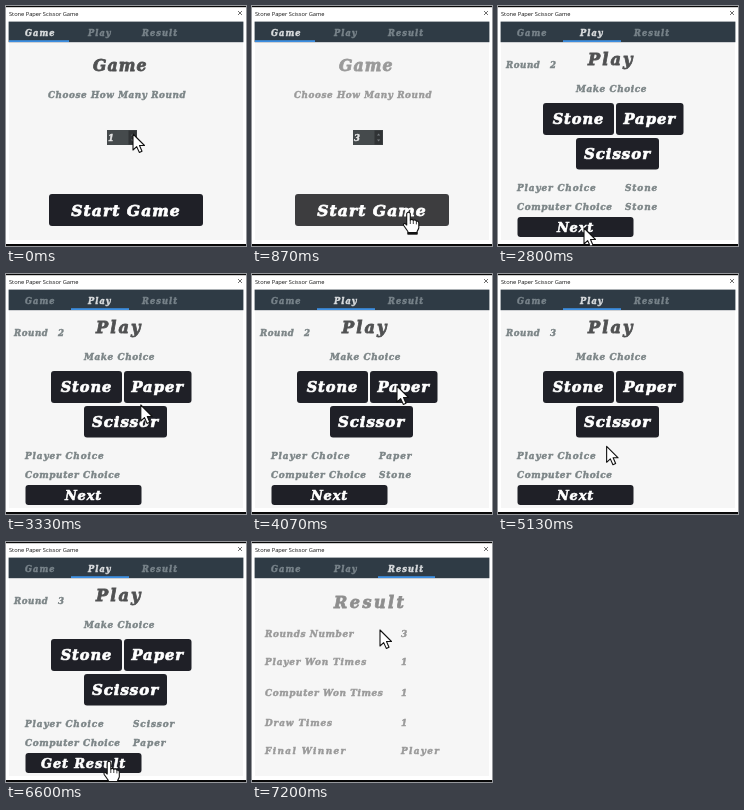
These frames come from a looping animation (240x240 px, 7.27 s). An HTML page:

```html
<!DOCTYPE html>
<html lang="en">
<head>
<meta charset="utf-8">
<title>Stone Paper Scissor Game</title>
<style>
html, body { margin: 0; width: 100%; height: 100%; overflow: hidden; background: #fff; }
svg { display: block; width: 100vw; height: 100vh; }
text { white-space: pre; }
.fun { font-family: "DejaVu Serif", serif; font-weight: 700; font-style: italic; fill: currentColor; stroke: currentColor; stroke-width: .05em; }
.title { font: 5.7px "Open Sans", sans-serif; fill: #111; }
</style>
</head>
<body>
<svg id="stage" viewBox="0 0 240 240"></svg>
<script>
const LOOP = 7270;
const NS = "http://www.w3.org/2000/svg";
const DARK = "#505152", SOFT = "#7c8587", PALE = "#9a9a9a";
const INK = "#1f2027", HOVER = "#3d3d3f";
const TAB = "#78838a", TAB_ON = "#d9dcde";
const stage = document.getElementById("stage");

function add(parent, tag, attrs) {
  const el = document.createElementNS(NS, tag);
  for (const k in attrs) el.setAttribute(k, attrs[k]);
  parent.appendChild(el);
  return el;
}
const rect = (p, x, y, width, height, fill, rx = 0) =>
  add(p, "rect", { x, y, width, height, fill, rx });

function setText(el, str) {
  if (el.textContent !== str) el.textContent = str;
}
// Low, wide, heavy lettering: slightly smaller type with open tracking
function label(p, x, y, size, str, color, gap = 0, anchor = "start") {
  const el = add(p, "text", {
    x, y: y - size * .04, class: "fun", color, "font-size": size * .9,
    "letter-spacing": size * .06 + gap, "text-anchor": anchor
  });
  setText(el, str);
  return el;
}
function button(p, x, y, w, h, size, str) {
  const box = rect(p, x, y, w, h, INK, 3);
  const text = label(p, x + w / 2, y + h / 2 + size * .36, size, str, "#fff", 0, "middle");
  return { box, text };
}
const show = (el, on) => el.setAttribute("display", on ? "inline" : "none");

// Window
rect(stage, 0, 0, 240, 240, "#fff");
rect(stage, 3, 36, 234, 198, "#f6f6f6");
add(stage, "text", { x: 3, y: 10, class: "title" }).textContent = "Stone Paper Scissor Game";
add(stage, "path", { d: "M232 5l4 4m0-4l-4 4", stroke: "#333", "stroke-width": .7 });
rect(stage, 2.6, 15.6, 234.8, 20.6, "#2f3b45");
const tabs = [[19, "Game"], [82, "Play"], [136, "Result"]]
  .map(([x, s]) => label(stage, x, 30, 9.2, s, TAB, .5));
const underline = rect(stage, 3, 34.2, 60, 1.8, "#3d8ee0");
const lines = [[3, 60], [65, 58], [126, 57]];

// Game page
const game = add(stage, "g", {});
const gameHead = label(game, 87, 66, 17.5, "Game", DARK);
const gameSub = label(game, 42, 92.5, 9.8, "Choose How Many Round", SOFT);
rect(game, 101, 124, 30, 15, "#454a4c");
rect(game, 122.5, 124.5, 8, 14, "#303335");
add(game, "path", { d: "M125 129.5l1.6-2 1.6 2zM125 133.5l1.6 2 1.6-2z", fill: "#777c80" });
const rounds = label(game, 102, 135, 9.5, "1", "#e4e4e4");
const start = button(game, 43, 188, 154, 32, 17.3, "Start Game");

// Play page
const play = add(stage, "g", {});
label(play, 90, 60, 18, "Play", DARK, 1);
label(play, 8, 62.5, 9.6, "Round", SOFT);
const roundNo = label(play, 52, 62.5, 9.6, "1", SOFT);
label(play, 78, 86.5, 9.9, "Make Choice", SOFT);
button(play, 45, 97, 71, 32, 16.2, "Stone");
button(play, 118, 97, 67.5, 32, 16.4, "Paper");
button(play, 78, 132, 83, 31.5, 16.6, "Scissor");
label(play, 19, 185, 9.9, "Player Choice", SOFT, .25);
label(play, 19, 204, 9.9, "Computer Choice", SOFT);
const mine = label(play, 127, 185, 9.9, "", SOFT, .3);
const theirs = label(play, 127, 204, 9.9, "", SOFT, .3);
const next = button(play, 19.5, 211, 116, 20, 14.4, "Next");
const spinner = add(play, "g", {});
for (let i = 0; i < 8; i++) {
  const a = i * Math.PI / 4;
  add(spinner, "circle", {
    cx: 5 * Math.cos(a), cy: 5 * Math.sin(a), r: 1.45, fill: "#111", opacity: .25 + i * .107
  });
}

// Result page
const result = add(stage, "g", {});
label(result, 82, 67, 17.8, "Result", "#8e8e8e", 1.4);
[
  ["Rounds Number", "3", 95, 0],
  ["Player Won Times", "1", 123, .2],
  ["Computer Won Times", "1", 154, 0],
  ["Draw Times", "1", 184, .3],
  ["Final Winner", "Player", 212.5, .8]
].forEach(([name, value, y, gap]) => {
  label(result, 13, y, 9.9, name, PALE, gap);
  label(result, 149, y, 9.9, value, PALE, .7);
});

rect(stage, 0, 0, 240, 1.2, "#080808");
rect(stage, 0, 238, 240, 2, "#080808");

// Pointers, with the tip at 0,0
const pen = { fill: "#fff", stroke: "#111", "stroke-width": 1.1, "stroke-linejoin": "round" };
const arrow = add(stage, "path", { d: "M0 0V16L3.7 12.6 6.3 18.4 9 17.2 6.5 11.5H11.5Z", ...pen });
const hand = add(stage, "g", {});
add(hand, "path", {
  d: "M-1.8 1.5Q0 -1 1.8 1.5V8Q3.6 6.6 4.8 8.4Q6.8 7.2 7.9 9.2Q10 8.6 10.3 11V16Q9.5 18 8.6 19.5V22H-.6V19.5L-4.8 13.5Q-5.6 11 -3.2 11.6L-1.8 13Z", ...pen
});
add(hand, "path", { d: "M1.8 8V12M4.8 8.6V12M7.9 9.4V12.4", stroke: "#111", "stroke-width": .8 });
rect(hand, -.8, 20, 9.6, 2.4, "#111");

// Pointer stops: time, x, y
const path = [
  [0, 127, 128], [460, 127, 128], [730, 156.5, 206], [1000, 156.5, 206],
  [1400, 82, 104], [2240, 82, 104], [2600, 86, 222], [3000, 86, 222],
  [3450, 145, 112], [4420, 145, 112], [4720, 88, 220], [4880, 88, 220],
  [5300, 120, 146], [5680, 120, 146], [6000, 103, 185], [6260, 103, 219],
  [6830, 103, 219], [7200, 128, 88], [LOOP, 128, 88]
];
const ease = u => u * u * (3 - 2 * u);
function pointer(t) {
  const i = path.findIndex(p => p[0] > t);
  const a = path[i - 1], b = path[i];
  const u = ease((t - a[0]) / (b[0] - a[0]));
  return [a[1] + (b[1] - a[1]) * u, a[2] + (b[2] - a[2]) * u];
}

// Each turn: pick, reveal, clear, player's and computer's choice
const turns = [
  [1600, 2130, 3000, "Stone", "Stone"],
  [3560, 4000, 4930, "Paper", "Stone"],
  [5600, 6260, 6670, "Scissor", "Paper"]
];
const overButton = [[670, 1050], [1330, 2270], [2520, 2730], [3380, 3900], [4650, 4760], [5230, 5640], [6230, 6640]];
const within = (t, a, b) => t >= a && t < b;

function render(t) {
  const page = t < 1000 ? 0 : t < 6670 ? 1 : 2;
  [game, play, result].forEach((g, i) => show(g, i === page));
  tabs.forEach((el, i) => el.setAttribute("color", i === page ? TAB_ON : TAB));
  underline.setAttribute("x", lines[page][0]);
  underline.setAttribute("width", lines[page][1]);

  const pressed = t >= 800;
  gameHead.setAttribute("color", pressed ? PALE : DARK);
  gameSub.setAttribute("color", pressed ? PALE : SOFT);
  start.box.setAttribute("fill", pressed ? HOVER : INK);
  setText(rounds, t < 200 ? "1" : t < 400 ? "2" : "3");

  setText(roundNo, t < 2730 ? "1" : t < 4760 ? "2" : "3");
  setText(next.text, t < 5600 ? "Next" : "Get Result");
  const turn = turns.find(r => within(t, r[0], r[2]));
  setText(mine, turn ? turn[3] : "");
  setText(theirs, turn && t >= turn[1] ? turn[4] : "");
  show(spinner, turn && t < turn[1]);
  spinner.setAttribute("transform", `translate(135 202) rotate(${Math.floor(t / 70) * 45})`);

  const move = `translate(${pointer(t).map(v => v.toFixed(2)).join(" ")})`;
  const onButton = overButton.some(([a, b]) => within(t, a, b));
  show(hand, onButton);
  show(arrow, !onButton);
  hand.setAttribute("transform", move);
  arrow.setAttribute("transform", move);
}

const begin = performance.now();
function tick() {
  render((performance.now() - begin) % LOOP);
  requestAnimationFrame(tick);
}
render(0);
requestAnimationFrame(tick);
</script>
</body>
</html>
```
